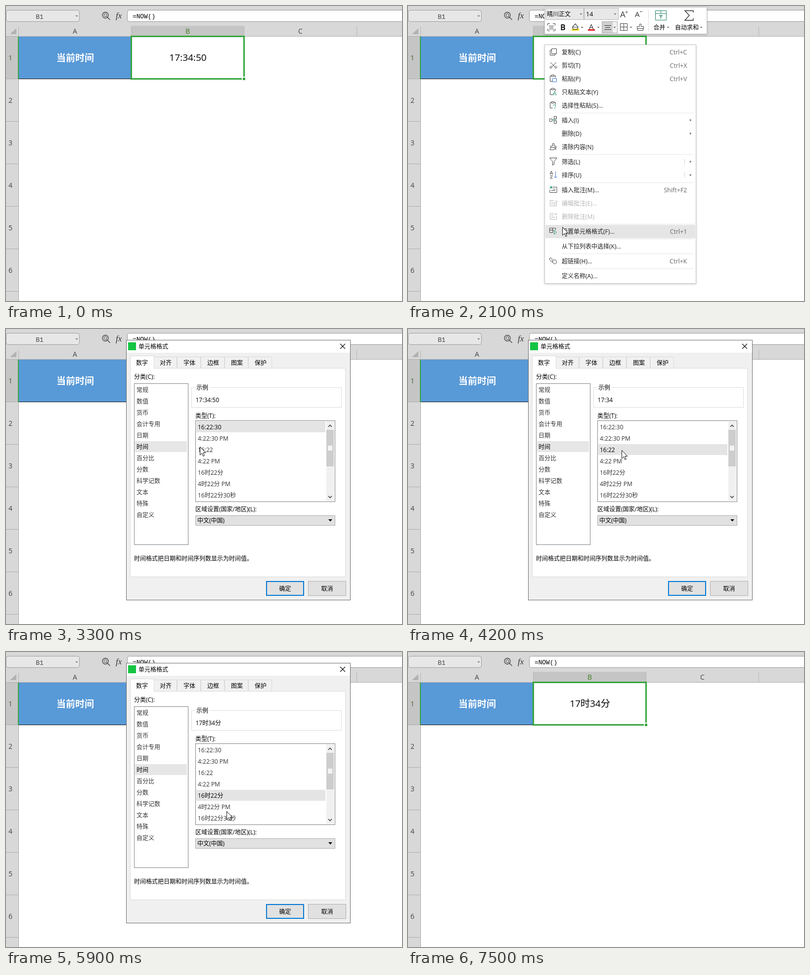
An HTML page with a canvas for the animation above (7900 ms loop, 801x597 px).

```html
<!DOCTYPE html>
<html lang="zh-CN">
<head>
<meta charset="utf-8">
<title>单元格格式</title>
<style>
html, body { margin: 0; width: 100%; height: 100%; overflow: hidden; background: #fff; }
canvas { display: block; }
</style>
</head>
<body>
<canvas id="stage" width="801" height="597"></canvas>
<script>
const W = 801, H = 597, LOOP = 7900;
const UI = "'Open Sans','Noto Sans CJK SC','Noto Sans CJK',sans-serif";
const MONO = "'Liberation Mono',monospace";
const GREEN = '#36a53e', BLUE = '#0078d7';
const screen = document.getElementById('stage').getContext('2d');
const layer = document.createElement('canvas');
layer.width = W;
layer.height = H;
const layerCtx = layer.getContext('2d');
let c = screen;

function fill(x, y, w, h, color) {
  c.fillStyle = color;
  c.fillRect(x, y, w, h);
}

// One-pixel frame whose outer edge is x, y, w, h
function box(x, y, w, h, bg, edge) {
  fill(x, y, w, h, edge);
  fill(x + 1, y + 1, w - 2, h - 2, bg);
}

// Text centred on cy, its baseline on a whole pixel to stay crisp
function text(s, x, cy, { size = 12, color = '#000', align = 'left', weight = '', font = UI } = {}) {
  c.font = `${weight} ${size}px ${font}`;
  c.fillStyle = color;
  c.textAlign = align;
  c.fillText(s, x, Math.round(cy + size * 0.39));
}

function icon(d, x, y, color = '#444', solid = false, width = 1) {
  c.save();
  c.translate(x, y);
  c.lineWidth = width;
  c.strokeStyle = c.fillStyle = color;
  const p = new Path2D(d);
  solid ? c.fill(p) : c.stroke(p);
  c.restore();
}

const caret = (x, y, color = '#777') => icon('M-2.5 -1h5l-2.5 3z', x, y, color, true);

function rounded(x, y, w, h, bg, edge) {
  c.beginPath();
  c.roundRect(x, y, w, h, 4);
  c.fillStyle = bg;
  c.fill();
  c.strokeStyle = edge;
  c.lineWidth = 1;
  c.stroke();
}

function popup(x, y, w, h) {
  c.save();
  c.shadowColor = 'rgba(0,0,0,.22)';
  c.shadowBlur = 4;
  c.shadowOffsetY = 1;
  fill(x, y, w, h, '#c6c6c6');
  c.restore();
  fill(x + 1, y + 1, w - 2, h - 2, '#fff');
}

function drawSheet(value) {
  fill(0, 0, W, H, '#fff');
  fill(0, 0, W, 62, '#d8d8d8');
  rounded(0.5, 8.5, 148, 23, '#e7e7e7', '#9d9d9d');
  text('B1', 68, 20.5, { size: 13, align: 'center', font: MONO, color: '#444' });
  caret(143, 20);
  rounded(245.5, 8.5, 570, 23, '#fff', '#989898');
  text('=NOW()', 256, 20, { size: 12.8, font: MONO });
  icon('M7 0a6 6 0 1 0 -12 0a6 6 0 1 0 12 0M5.5 4.5l5 5', 200, 18.5, '#444', false, 1.3);
  icon('M4 0a3 3 0 1 0 -6 0a3 3 0 1 0 6 0M3 2l4 4', 200, 18.5, '#444');
  text('fx', 222, 18.5, { size: 17, weight: 'italic', font: "'Liberation Serif',serif", color: '#333' });

  fill(253, 40, 229, 22, '#c5c5c5');
  icon('M21 45v12h-13z', 0, 0, '#b2b2b2', true);
  ['A', 'B', 'C'].forEach((s, i) =>
    text(s, 139.5 + 228 * i, 50.5, { size: 14, align: 'center', color: i === 1 ? '#3d7d1e' : '#444' }));
  for (let x = 25; x < W; x += 228) fill(x, 42, 1, 20, '#b5b5b5');
  fill(0, 61, W, 1, '#adadad');

  fill(0, 62, 25, H - 62, '#d8d8d8');
  fill(0, 62, 25, 86, '#c5c5c5');
  for (let i = 0; i < 6; i++) {
    text(i + 1, 9, 104.5 + 86 * i, { size: 14, align: 'center', color: i ? '#444' : '#466238' });
    fill(0, 147 + 86 * i, 25, 1, '#adadad');
  }
  fill(25, 62, 1, H - 62, '#a9a9a9');
  fill(26, 62, 227, 85, '#5899d7');
  fill(26, 147, 227, 1, '#111');
  fill(24, 62, 2, 86, GREEN);
  text('当前时间', 140, 104.5, { size: 19, weight: 'bold', align: 'center', color: '#fff' });

  fill(252, 60, 231, 89, GREEN);
  fill(255, 63, 225, 83, '#fff');
  fill(477, 143, 8, 8, '#fff');
  fill(479, 145, 5, 5, GREEN);
  fill(480, 63, 3, 80, GREEN);
  fill(255, 146, 222, 3, GREEN);
  text(value, 368, 104, { size: 19, align: 'center' });
}

const CLIP = 'M4 2.5h-2.5v11h5M10 2.5h2.5v3.5M4.5 .5h5v3h-5z';
const NOTE = 'M7 2.5h8v11h-14v-6M4 9.5h8M7 6.5h5';
const DIM = '#b4b4b4';
// Row centre, label, shortcut or arrow, icon, accent icon, accent colour
const ROWS = [
  [93, '复制(C)', 'Ctrl+C', 'M4.5 1.5h10v10h-10zM4.5 4.5h-3v10h10v-3'],
  [120, '剪切(T)', 'Ctrl+X', 'M2 2l9 9M14 2l-9 9M3 10a2 2 0 1 0 .1 0M13 10a2 2 0 1 0 .1 0'],
  [147, '粘贴(P)', 'Ctrl+V', CLIP, 'M6.5 7.5h8v7h-8z', '#3b78d8'],
  [174, '只粘贴文本(Y)', '', CLIP, 'M7 15l3.5-9 3.5 9M8 12h5', '#26926a'],
  [201, '选择性粘贴(S)...', '', CLIP, 'M8 9a2.5 2.5 0 1 1 3 2.4v1.6M11 14v1.5', '#26926a'],
  [231, '插入(I)', '>', 'M.5 5.5h5v5h-5zM9.5 .5h5v5h-5zM9.5 9.5h5v5h-5z', 'M14 7.5h-7M9 5.5l-2 2 2 2', '#26926a'],
  [258, '删除(D)', '>'],
  [285, '清除内容(N)', '', 'M6.5 1.5h3v5h4v3h-11v-3h4zM3 9l-2 5h9', 'M10 10l4 4M14 10l-4 4', '#444'],
  [315, '筛选(L)', '|>', 'M.5 .5h15l-6 7v6l-3 1.5v-7.5z'],
  [342, '排序(U)', '|>', 'M1 7l3-7 3 7M2 5h4M1.5 9.5h5l-5 5h5', 'M12.5 1v13M9.5 11l3 3 3-3', '#3b78d8'],
  [372, '插入批注(M)...', 'Shift+F2', NOTE, 'M3.5 0v6M.5 1.5l6 3M6.5 1.5l-6 3', '#26926a'],
  [399, '编辑批注(E)...', '', 'M14.5 7v6.5h-13v-11h8M4 6.5h4M4 9.5h3M8 10l6-7 2 2-6 6z', '', DIM],
  [426, '删除批注(M)', '', 'M14.5 7v6.5h-13v-11h8M4 6.5h4M4 9.5h7M11 1l4 4M15 1l-4 4', '', DIM],
  [456, '设置单元格格式(F)...', 'Ctrl+1', 'M7 10.5h-6.5v-9h12v4M.5 5.5h8M6.5 1.5v9', 'M9.5 6l5 4-5 4z', '#26926a'],
  [486, '从下拉列表中选择(K)...', ''],
  [516, '超链接(H)...', 'Ctrl+K', 'M8 9l-3-3a3 3 0 0 0-4-4a3 3 0 0 0 0 4l3 3a3 3 0 0 0 4 0M7 6l3 0a3 3 0 0 1 4 4a3 3 0 0 1-5 3l-3-3'],
  [546, '定义名称(A)...', ''],
];

function drawMenu(mouse) {
  popup(276, 78, 307, 484);
  for (const [y, label, key, d, accent, tint] of ROWS) {
    const off = tint === DIM;
    if (mouse.x > 277 && mouse.y >= y - 13 && mouse.y < y + 14) fill(278, y - 13, 303, 27, '#e5e5e5');
    text(label, 311, y, { color: off ? DIM : '#222' });
    if (d) icon(d, 286, y - 8, off ? DIM : '#444');
    if (accent) icon(accent, 286, y - 8, tint);
    if (key.endsWith('>')) icon('M0 -2.5l3.5 2.5 -3.5 2.5z', 570, y, '#777', true);
    else text(key, 564.5, y, { size: 12.5, align: 'right', color: '#666' });
    if (key[0] === '|') fill(559, y - 6, 1, 12, '#d4d4d4');
  }
  for (const y of [216, 300, 357, 441, 471, 501, 531]) fill(311, y, 267, 1, '#e6e6e6');
}

function drawToolbar() {
  popup(276, 2, 329, 55);
  box(278, 4, 78, 24, '#e8e8e8', '#b5b5b5');
  box(356, 4, 70, 24, '#e8e8e8', '#b5b5b5');
  text('晴川正文', 281, 16);
  text('14', 360, 16, { size: 12.5 });
  text('A', 429, 16, { size: 17, color: '#333' });
  text('+', 439, 12, { size: 11, color: '#333' });
  text('A', 459, 16.5, { size: 15, color: '#333' });
  icon('M469 11.5h5', 0, 0);
  icon('M5 .5h-4.5v4M11 .5h4.5v4M.5 11v4h4.5M15.5 11v4h-4.5M3 5.5h10M4 8.5h8M3 11.5h10', 282, 35);
  text('B', 308, 43, { size: 16, weight: 'bold', color: '#222' });
  fill(331, 46, 15, 4, '#f2dc1e');
  icon('M2.5 8l6-7 5.5 6.5-2 5h-7.5zM2.5 8h11', 330, 35, '#444', false, 1.2);
  text('A', 366, 41, { size: 15, color: '#333' });
  fill(364, 47, 14, 3, '#e3232b');
  box(392, 31, 32, 24, '#d0d0d0', '#a8a8a8');
  fill(414, 32, 9, 22, '#f2f2f2');
  icon('M397 39.5h14M399 43.5h10M397 47.5h14', 0, 0, '#333');
  icon('M.5 .5h14v14h-14zM7.5 .5v14M.5 7.5h14', 429, 35);
  icon('M6.5 1.5h3v5h5v4h-13v-4h5zM2.5 10.5v4h11v-4', 462, 35);
  fill(486, 8, 1, 44, '#dcdcdc');
  icon('M.5 .5h22v19h-22zM.5 6.5h22M11.5 .5v6', 500, 9, '#26806a');
  icon('M8 10.5h7M11.5 10.5v6', 500, 9, '#26806a', false, 1.5);
  text('合并', 496.5, 43);
  icon('M18 4v-3.5h-17l9 9.5-9 10h17v-4', 559, 9, '#333', false, 1.4);
  text('自动求和', 540, 43);
  for (const [x, y] of [[350, 16], [419, 16], [352, 43], [385, 43], [418, 43], [451, 43], [526, 43], [593, 43]]) caret(x, y);
}

const KINDS = '常规 数值 货币 会计专用 日期 时间 百分比 分数 科学记数 文本 特殊 自定义'.split(' ');
const TABS = '数字 对齐 字体 边框 图案 保护'.split(' ');
const TYPES = ['16:22:30', '4:22:30 PM', '16:22', '4:22 PM', '16时22分', '4时22分 PM', '16时22分30秒'];
const SAMPLES = { 0: '17:34:50', 2: '17:34', 3: '5:34 PM', 4: '17时34分' };

const inside = (m, x, y, w, h) => m.x >= x && m.x < x + w && m.y >= y && m.y < y + h;

function drawDialog(picked, mouse) {
  box(243, 22, 454, 527, '#f0f0f0', '#6c6c6c');
  fill(244, 23, 452, 25, '#fff');
  fill(247, 27, 16, 16, '#14c443');
  text('单元格格式', 268, 35);
  icon('M-5 -5l10 10M5 -5l-10 10', 681, 35, '#111', false, 1.2);

  box(251, 79, 436, 423, '#fff', '#dcdcdc');
  TABS.forEach((s, i) => {
    if (i) box(251 + 47.8 * i | 0, 56, 48, 24, '#f1f1f1', '#dadada');
    text(s, 275 + 48 * i, 68.5, { align: 'center' });
  });
  box(251, 54, 49, 26, '#fff', '#dadada');
  fill(252, 79, 47, 2, '#fff');
  text(TABS[0], 275, 68, { align: 'center' });

  text('分类(C):', 259, 96);
  box(259, 110, 110, 327, '#fff', '#7e838a');
  fill(261, 227, 105, 22, '#e6e6e6');
  KINDS.forEach((s, i) => text(s, 264, 123.5 + 23 * i, { color: i === 5 ? '#000' : '#333' }));

  box(375, 118, 304, 41, '#fff', '#dcdcdc');
  fill(383, 117, 29, 3, '#fff');
  text('示例', 385, 118.5);
  text(SAMPLES[picked], 383.5, 143.5);

  text('类型(T):', 383, 175);
  box(383, 185, 283, 165, '#fff', '#7e838a');
  fill(385, 187.5 + 23 * picked | 0, 261, 22, '#e4e4e4');
  TYPES.forEach((s, i) => text(s, 388, 198.5 + 23 * i, { color: i === picked ? '#000' : '#333' }));
  fill(648, 187, 16, 161, '#f0f0f0');
  fill(648, 204, 15, 74, '#cdcdcd');
  fill(651, 236, 9, 10, '#f3f3f3');
  icon('M-3.5 2l3.5 -3.5 3.5 3.5', 655.5, 196, '#444', false, 1.6);
  icon('M-3.5 -2l3.5 3.5 3.5 -3.5', 655.5, 340, '#444', false, 1.6);

  text('区域设置(国家/地区)(L):', 383, 364.5);
  const hot = inside(mouse, 383, 377, 283, 21);
  box(383, 377, 283, 21, hot ? '#e5f1fb' : '#e1e1e1', hot ? BLUE : '#adadad');
  text('中文(中国)', 387, 387.5);
  icon('M652 385h8l-4 4.5z', 0, 0, '#000', true);
  text('时间格式把日期和时间序列数显示为时间值。', 259, 464.5);

  const over = inside(mouse, 526, 510, 77, 30);
  box(526, 510, 77, 30, BLUE, BLUE);
  if (over) fill(527, 511, 75, 28, '#d9edfa');
  else fill(528, 512, 73, 26, '#e1e1e1');
  text('确定', 564.5, 525, { align: 'center' });
  box(611, 510, 77, 30, '#e1e1e1', '#adadad');
  text('取消', 649.5, 525, { align: 'center' });
}

// Pointer path: time, x, y
const PATH = [
  [100, 684, 50], [200, 640, 62], [500, 350, 94], [600, 275, 96], [700, 254, 96],
  [800, 270, 82], [900, 270, 82], [1000, 270, 73], [1100, 270, 73], [1200, 270, 72],
  [1400, 270, 72], [1500, 282, 102], [1700, 300, 260], [2000, 314, 455], [2100, 312, 447],
  [2600, 312, 447], [3000, 322, 272], [3200, 360, 250], [3500, 456, 214], [3800, 440, 226],
  [4000, 432, 245], [4300, 432, 245], [4500, 432, 266], [4600, 432, 266], [4900, 460, 355],
  [5000, 460, 355], [5100, 500, 392], [5300, 549, 441], [5600, 430, 300], [5700, 430, 293],
  [5800, 430, 293], [6600, 558, 523], [6800, 558, 523], [7400, 787, 46],
];

function pointerAt(t) {
  const i = Math.max(1, PATH.findIndex(p => p[0] >= t));
  const [t0, x0, y0] = PATH[i - 1], [t1, x1, y1] = PATH[i];
  const k = (t - t0) / (t1 - t0);
  return { x: Math.round(x0 + (x1 - x0) * k), y: Math.round(y0 + (y1 - y0) * k) };
}

const ARROW = 'M.5 .5v16.5l3.8-3.6 2.6 6 2.5-1.1-2.6-5.8h5z';
const CROSS = 'M-2 -7h5v5h5v5h-5v5h-5v-5h-5v-5h5z';
const DOWN = 'M-1 -12h3v7h3l-4.5 5 -4.5 -5h3z';

function drawPointer({ x, y }, onSheet) {
  if (onSheet && y < 62) return icon(DOWN, x, y, '#111', true);
  const d = onSheet ? CROSS : ARROW, o = onSheet ? -0.5 : 0;
  icon(d, x + o, y + o, '#fff', true);
  icon(d, x + o, y + o, '#111');
}

function showDialog(picked, mouse, alpha) {
  layerCtx.clearRect(0, 0, W, H);
  c = layerCtx;
  drawDialog(picked, mouse);
  c = screen;
  const s = 1 - 0.055 * (1 - alpha);
  c.save();
  c.globalAlpha = alpha;
  c.translate(470, 285.5);
  c.scale(s, s);
  c.drawImage(layer, -470, -285.5);
  c.restore();
}

function draw(t) {
  const shown = t >= 100 && t < 7500;
  const mouse = shown ? pointerAt(t) : { x: -99, y: -99 };
  drawSheet(t < 6800 ? SAMPLES[0] : SAMPLES[4]);
  if (t >= 1200 && t < 2300) {
    drawMenu(mouse);
    drawToolbar();
  }
  if (t >= 2500 && t < 6900) {
    const picked = t < 4200 ? 0 : t < 4600 ? 2 : t < 5700 ? 3 : 4;
    const alpha = t === 2500 ? 0.45 : t === 2600 ? 0.85 : t === 6800 ? 0.5 : 1;
    showDialog(picked, mouse, alpha);
  }
  if (shown) drawPointer(mouse, t < 1200 || t >= 6900);
}

const start = performance.now();
function tick() {
  const t = (performance.now() - start) % LOOP;
  draw(Math.floor(t / 100) * 100);
  requestAnimationFrame(tick);
}
tick();
</script>
</body>
</html>
```
